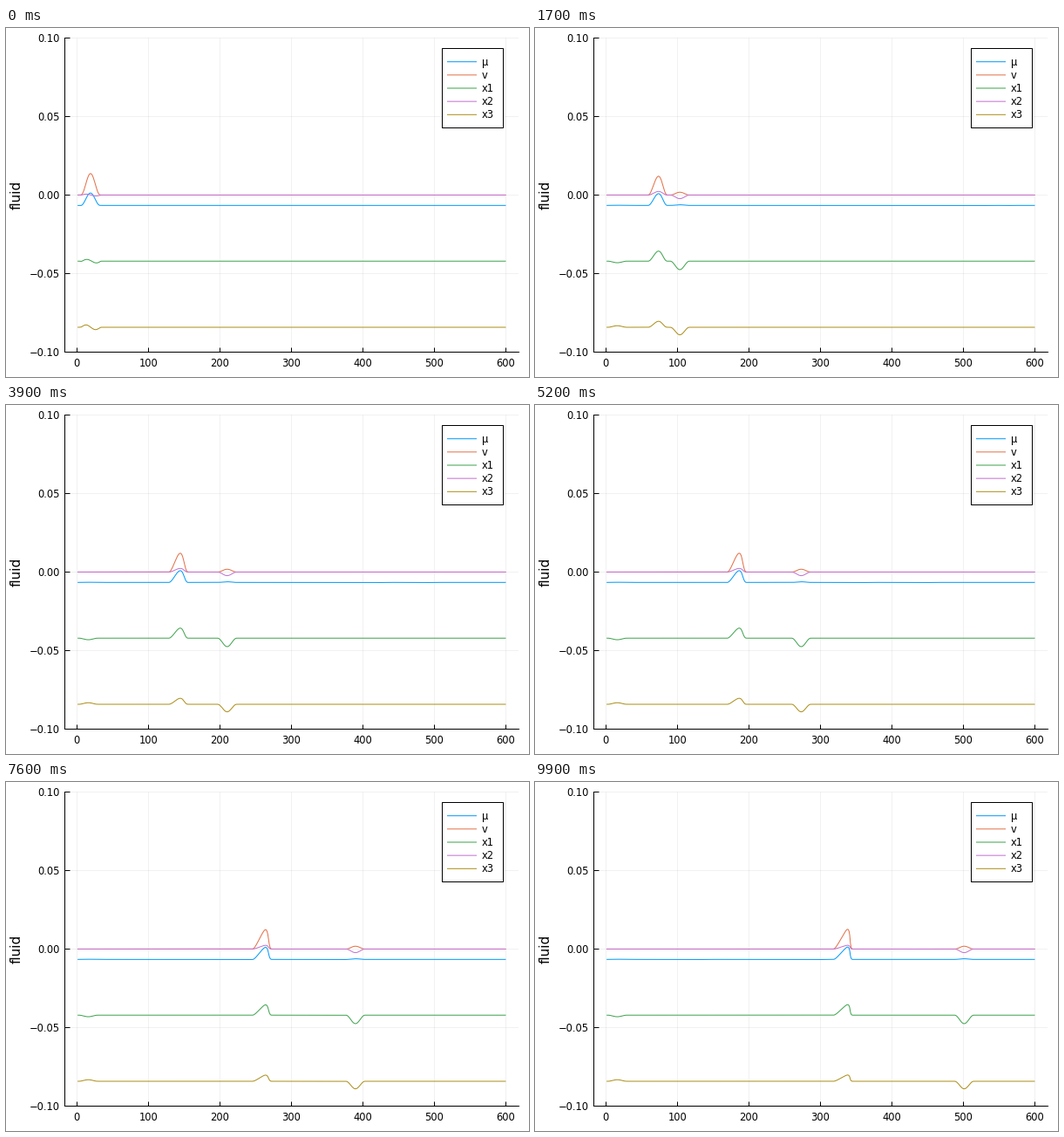
Write a matplotlib script that moves like this. It is 600x400 px and loops after 10 s.

```python
import numpy as np
import matplotlib.pyplot as plt
from matplotlib.animation import FuncAnimation
from matplotlib.patches import Rectangle

W, H, DPI = 600, 400, 100
PX = 72 / DPI
FRAMES, INTERVAL = 100, 100
LEFT, RIGHT, TOP, BOTTOM = 67.4, 588.2, 11.45, 371.45
N = 600
HALF = 13.4
SLOW, FAST = 3.16, 4.85
STEEPEN = 0.0657

plt.rcParams.update({"font.family": "DejaVu Sans", "font.size": 8.3,
                     "lines.linewidth": PX, "lines.solid_capstyle": "butt"})

NAMES = ["μ", "v", "x1", "x2", "x3"]
COLORS = ["#009AFA", "#E36F47", "#3EA44E", "#C371D2", "#AC8E18"]
REST = np.array([-0.0066, 0, -0.0421, 0, -0.0842])

# The initial push acts on μ and v only and splits into three modes
push = np.array([0.0080, 0.0138, 0, 0, 0])
slow = np.array([0.0075, 0.0120, 0.0064, 0.0023, 0.0038])
fast = np.array([0.0004, 0.0018, -0.0054, -0.0023, -0.0048])
still = push - slow - fast
echo = -0.01 * push * [1, 0, 0, 0, 0]

x = np.arange(1, N + 1)
xi = np.linspace(-HALF, HALF, 261)
bump = np.cos(np.pi * xi / (2 * HALF)) ** 2


def pulse(center, lean=0, tip=0):
    """Periodic bump; lean moves its crest ahead of its foot."""
    d = (x - center + N / 2) % N - N / 2
    height = bump + tip * np.exp(-(xi / 3) ** 2)
    return np.interp(d, xi + lean * bump, height, left=0, right=0)


def state(step):
    tip = 0.05 * np.clip((step - 55) / 35, 0, 1)
    parts = [
        (slow, pulse(18.8 + SLOW * step, STEEPEN * step, tip)),
        (fast, pulse(21 + FAST * step)),
        (still, pulse(16)),
        (echo, pulse(13 - SLOW * step)),
        (echo, pulse(11 - FAST * step)),
    ]
    return REST[:, None] + sum(np.outer(amp, shape) for amp, shape in parts)


fig = plt.figure(figsize=(W / DPI, H / DPI), dpi=DPI, facecolor="white")
ax = fig.add_axes([LEFT / W, 1 - BOTTOM / H, (RIGHT - LEFT) / W, (BOTTOM - TOP) / H])
pad = 0.03 * (N - 1)
ax.set_xlim(1 - pad, N + pad)
ax.set_ylim(-0.1, 0.1)
ax.set_xticks(range(0, N + 1, 100))
ax.set_yticks(np.linspace(-0.1, 0.1, 5))
ax.tick_params(direction="in", length=5.5 * PX, width=PX, pad=7 * PX)
ax.tick_params(axis="y", pad=6 * PX)
ax.grid(color="black", alpha=0.055, linewidth=PX)
ax.set_axisbelow(True)
ax.spines[["top", "right"]].set_visible(False)
ax.spines[["left", "bottom"]].set_linewidth(PX)

curves = [ax.plot(x, np.full(N, r), color=c)[0] for r, c in zip(REST, COLORS)]

# Overlay in pixel units for the axis title and the legend
page = fig.add_axes([0, 0, 1, 1])
page.set_xlim(0, W)
page.set_ylim(H, 0)
page.axis("off")
page.text(16.8, 191, "fluid", size=11, rotation=90, rotation_mode="anchor",
          ha="center", va="baseline")
page.add_patch(Rectangle((500.4, 23.4), 70, 91, fc="white", ec="black", lw=PX))
for i, (name, color) in enumerate(zip(NAMES, COLORS)):
    y = 38.7 + 15.15 * i
    page.plot([506, 540], [y, y], color=color, snap=False)
    page.text(545.6, y + 4, name, va="baseline")


def update(step):
    for curve, values in zip(curves, state(step)):
        curve.set_ydata(values)
    return curves


anim = FuncAnimation(fig, update, frames=FRAMES, interval=INTERVAL,
                     repeat=True, repeat_delay=0, blit=False)
plt.show()
```
